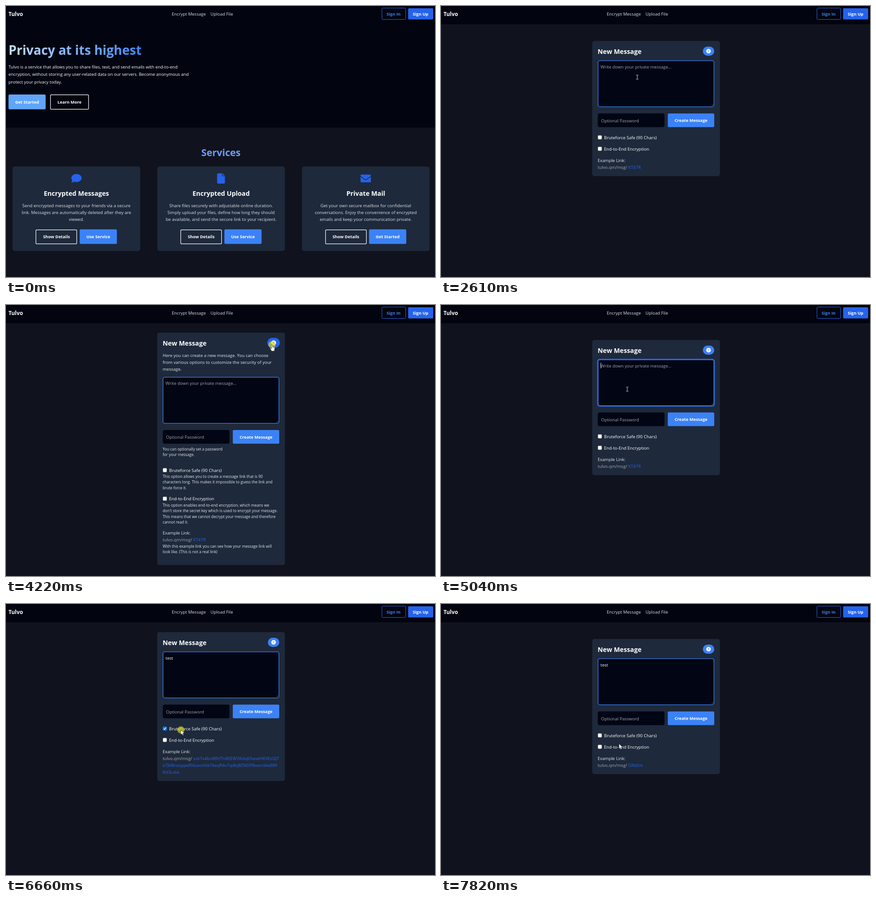
Animation of 942 by 594 pixels, one loop 8000 ms. Source, as an HTML page:

```html
<!DOCTYPE html>
<html lang="en">
<head>
<meta charset="utf-8">
<title>Private message demo</title>
<style>
html, body { margin: 0; width: 100%; height: 100%; overflow: hidden; background: #10121d; }
svg { display: block; width: 942px; height: 594px; font-family: 'Open Sans', 'Noto Sans', sans-serif; }
</style>
</head>
<body>
<svg id="stage" viewBox="0 0 942 594"></svg>
<script>
const LOOP = 8000, BASE = 9.5, SMALL = 8.35, TITLE = 14.2, LABEL = 9.2;
const DARK = '#020510', PAGE = '#10121d', CARD = '#1e293b', BLUE = '#3b82f6', DEEP = '#2563eb';
const SOFT = '#dde1e7', GREY = '#a0a7b3';

// y is the middle of the capitals
const text = (s, x, y, fill = '#fff', size = BASE, weight = 400, anchor = 'start') =>
  `<text x="${x}" y="${y + size * 0.37}" fill="${fill}" font-size="${size}" font-weight="${weight}" text-anchor="${anchor}">${s}</text>`;
const centered = (s, x, y, fill, size, weight) => text(s, x, y, fill, size, weight, 'middle');
const lines = (list, x, y, step, fill, size, anchor) =>
  list.map((s, i) => text(s, x, y + i * step, fill, size, 400, anchor)).join('');
const box = (x, y, w, h, fill, r = 0, extra = '') =>
  `<rect x="${x}" y="${y}" width="${w}" height="${h}" rx="${r}" fill="${fill}" ${extra}/>`;
const outline = (color, width) => `stroke="${color}" stroke-width="${width}"`;
const button = (label, x, y, w, h, fill) =>
  (fill ? box(x, y, w, h, fill, 2.5)
    : box(Math.round(x) + .6, Math.round(y) + .6, Math.round(w) - 1.2, Math.round(h) - 1.2, 'none', 2.2, outline('#fff', 1.2))) +
  centered(label, x + w / 2, y + h / 2 + .5, '#fff', LABEL, 700);

// Pointer: [time, x, y], eased between neighbours
const path = [
  [190, 890, 592], [990, 457, 88], [1050, 457, 88], [1450, 395, 18], [1920, 395, 18],
  [2500, 431, 156], [2740, 431, 156], [3420, 585, 96], [3700, 585, 96], [4050, 584, 87],
  [4350, 584, 87], [4900, 409, 184.5], [5640, 409, 184.5], [6050, 384, 276],
  [6780, 384, 276], [7120, 391, 306.5], [LOOP, 391, 306.5]
];
const clicks = [1400, 2750, 3560, 4130, 4850, 6050, 6590, 7140, 7480];
const between = (t, a, b) => t >= a && t < b;

function pointer(t) {
  const i = Math.max(1, path.findIndex(p => p[0] > t));
  const [t0, x0, y0] = path[i - 1], [t1, x1, y1] = path[i];
  const k = Math.min(1, Math.max(0, (t - t0) / (t1 - t0))), e = k * k * (3 - 2 * k);
  return { x: x0 + (x1 - x0) * e, y: y0 + (y1 - y0) * e };
}

const shapes = {
  arrow: '<path d="M0 0V10.5L2.4 8.3L4.2 12L5.8 11.3L4.2 7.6H7.5Z" fill="#fff" stroke="#111" stroke-width=".5"/>',
  hand: '<path d="M-1.2 .5Q0 -1 1.2 .5V5L5 6Q6.6 6.4 6.3 8.4L5.4 12V14H-1.6V12L-4.4 8.6Q-4 7-2.6 7.8L-1.2 9Z" fill="#fff" stroke="#111" stroke-width=".6"/>',
  beam: '<path d="M-2.5 -4.6H-.6L0 -4L.6 -4.6H2.5M0 -4V4M-2.5 4.6H-.6L0 4L.6 4.6H2.5" fill="none" stroke="#d5d7dc"/>'
};

function header(hover) {
  return text('Tulvo', 5.5, 17.5, '#fff', 11.86, 700) +
    text('Encrypt Message', 364, 17.2, hover ? '#fff' : SOFT) +
    text('Upload File', 449, 17.2, SOFT) +
    box(825.5, 4.5, 52, 25, 'none', 2, outline(DEEP, 1)) + centered('Sign In', 851, 17.3, BLUE, LABEL, 700) +
    box(883, 5, 55, 24.5, DEEP, 2) + centered('Sign Up', 910.3, 17.3, '#fff', LABEL, 700);
}

const icons = [
  `<ellipse cx="154.7" cy="377" rx="11.3" ry="9" fill="${DEEP}"/><path d="M145 379Q146 384 143 387Q148 387 151 384Z" fill="${DEEP}"/>`,
  `<path d="M466 366.8H474.5V371.5Q474.5 373 476 373H480.7V387Q480.7 389.3 478.5 389.3H466Q463.6 389.3 463.6 387V369Q463.6 366.8 466 366.8ZM475.8 366.8L480.7 371.7H475.8Z" fill="${DEEP}"/>`,
  box(778.5, 369.5, 22.7, 17, DEEP, 2.2) +
    `<path d="M778 373L788.2 380.4Q789.8 381.5 791.4 380.4L801.7 373" fill="none" ${outline(CARD, 1.5)}/>`
];
const services = [
  ['Encrypted Messages', 'Use Service', 'Send encrypted messages to your friends via a secure',
    'link. Messages are automatically deleted after they are', 'viewed.'],
  ['Encrypted Upload', 'Use Service', 'Share files securely with adjustable online duration.',
    'Simply upload your files, define how long they should', 'be available, and send the secure link to your recipient.'],
  ['Private Mail', 'Get Started', 'Get your own secure mailbox for confidential',
    'conversations. Enjoy the convenience of encrypted', 'emails and keep your communication private.']
];

function home(hover) {
  const cards = services.map(([title, action, ...about], i) => {
    const x = 14.4 + i * 317.7, mid = x + 140.2;
    return box(x, 351.7, 280.4, 185.3, CARD, 5) + icons[i] +
      centered(title, mid, 410.5, '#fff', TITLE, 700) +
      lines(about, mid, 437.3, 15.06, SOFT, BASE, 'middle') +
      button('Show Details', x + 51, 489.5, 91, 32) +
      button(action, x + 147.4, 489.5, 81.7, 32, BLUE);
  }).join('');
  return `<defs><linearGradient id="sky" gradientUnits="userSpaceOnUse" x1="6" x2="310">
      <stop stop-color="#bfdbfe"/><stop offset="1" stop-color="${BLUE}"/></linearGradient></defs>` +
    box(0, 0, 942, 266.5, DARK) + header(hover) +
    text('Privacy at its highest', 5.5, 97, 'url(#sky)', 28.1, 700) +
    lines(['Tulvo is a service that allows you to share files, text, and send emails with end-to-end',
      'encryption, without storing any user-related data on our servers. Become anonymous and',
      'protect your privacy today.'], 5.5, 133.6, 16.4, '#fff', 9.45) +
    button('Get Started', 5.5, 194, 81.5, 32.5, '#60a5fa') +
    button('Learn More', 97, 194, 84.7, 32.5) +
    centered('Services', 472, 320.8, '#6f9cf6', 21.2, 700) + cards;
}

const checkbox = (y, on) => box(344.6, y - 4.2, 8.4, 8.4, on ? '#1677e8' : '#fff', 1.4, outline(on ? '#1677e8' : '#777', .5)) +
  (on ? `<path d="M346.4 ${y}L348.2 ${y + 2}L351.4 ${y - 2.2}" fill="none" ${outline('#fff', 1.3)}/>` : '');

const longLink = ['xvkTx4bn8RHTn8EEW3KdqKXwwhlKXEsGJT', 'e7Jlt8nxsppeRlduvoh6kTkeqR4v7qdbj8ENDP8xenrbkdl89', '8d3Lvbx'];
const keyLink = ['RbWm4/pT7vKx2dHq9LnZs3GfYw6JcUe8B', 'h5NkQ1rVt0Mz'];

function compose(t, p) {
  const help = between(t, 3700, 4285), safe = between(t, 6130, 6730), e2e = between(t, 7210, 7550);
  const focus = between(t, 2740, 3560) || between(t, 4900, 6050);
  const link = safe ? longLink : e2e ? keyLink : [t < 6130 ? 'KT47R' : t < 7210 ? 'DWp3u' : 'GNdUo'];
  const typed = 'test'.slice(0, [5110, 5180, 5320, 5450].filter(at => t >= at).length);
  const top = help ? -16 : -7.5 * (link.length - 1);
  const [area, first, second, sample] = help ? [38.5, 74, 111.5, 161.5] : [top, top, top, top];
  const height = help ? 509.5 : 296.5 + 15 * (link.length - 1);

  const onHelp = Math.abs(p.x - 587.5) < 13 && Math.abs(p.y - 99 - top) < 12;
  const inArea = between(p.x, 344, 600) && between(p.y, 119 + area, 221 + area);
  const field = `x="344.8" y="${119.8 + area}" width="254.6" height="101" rx="4"`;
  const grip = 218 + area;

  const svg = box(0, 0, 942, 40, DARK) + header(t < 1980) +
    box(332, 76.5 + top, 280.5, height, CARD, 5) +
    text('New Message', 344, 100 + top, '#fff', TITLE, 700) +
    `<g transform="translate(587.5 ${99 + top}) scale(${onHelp ? 1.1 : 1})">` +
    box(-12.5, -10, 25, 20, onHelp ? DEEP : BLUE, 10) +
    '<circle r="5" fill="#fff"/>' + centered('?', 0, 0, onHelp ? DEEP : BLUE, 7.5, 700) + '</g>' +
    (help ? lines(['Here you can create a new message. You can choose',
      'from various options to customize the security of your', 'message.'], 344, 110.6, 15.06, '#e5e7eb') : '') +
    (focus ? `<rect ${field} fill="none" ${outline(DEEP, 5)} opacity=".5"/>` : '') +
    `<rect ${field} fill="#020513" ${outline(BLUE, focus ? 1.7 : 1.3)}/>` +
    `<path d="M594 ${grip + 1}L598 ${grip - 3}M596.5 ${grip + 1}L598 ${grip - .5}" ${outline('#8a8f99', .6)}/>` +
    text(typed || 'Write down your private message...', 350.3, 133.2 + area, typed ? '#fff' : GREY) +
    (between(t, 4900, 5110) ? box(350.6, 126.5 + area, .9, 12.5, '#fff') : '') +
    box(344.3, 235.5 + area, 146.5, 30, '#020513', 4) + text('Optional Password', 351.5, 251 + area, GREY) +
    button('Create Message', 498, 235.5 + area, 102, 30, BLUE) +
    checkbox(288 + first, safe) + text('Bruteforce Safe (90 Chars)', 358, 288.3 + first) +
    checkbox(313 + second, e2e) + text('End-to-End Encryption', 358, 313.3 + second) +
    text('Example Link:', 344, 338.3 + sample, '#e5e7eb') +
    text('tulvo.qm/msg/', 344, 353.4 + sample, GREY) +
    link.map((s, i) => text(s, i ? 344 : 411, 353.4 + sample + i * 15.06, DEEP)).join('') +
    (help ? [
      [315.7, 'You can optionally set a password', 'for your message.'],
      [375.8, 'This option allows you to create a message link that is 90',
        'characters long. This makes it impossible to guess the link and', 'brute force it.'],
      [438.5, 'This option enables end-to-end encryption, which means we',
        "don't store the secret key which is used to encrypt your message.",
        'This means that we cannot decrypt your message and therefore', 'cannot read it.'],
      [528.6, 'With this example link you can see how your message link will', 'look like. (This is not a real link)']
    ].map(([y, ...s]) => lines(s, 344, y, 12.55, '#e5e7eb', SMALL)).join('') : '');
  return { svg, shape: onHelp ? 'hand' : inArea ? 'beam' : 'arrow' };
}

function draw(t) {
  const p = pointer(t), onNav = between(p.x, 364, 439) && between(p.y, 10, 25);
  const scene = t < 1720 ? { svg: home(onNav), shape: 'arrow' } : compose(t, p);
  const shape = onNav ? 'hand' : scene.shape;
  let svg = box(0, 0, 942, 594, PAGE) + scene.svg;
  if (between(t, 1400, 1980)) svg += box(-3, 590, 71, 8, '#1a1712', 2) + text('tulvo.qm/msg', 8, 596, '#b8b5ae', 7.5);
  if (clicks.some(c => between(t, c, c + 145)))
    svg += `<circle cx="${p.x}" cy="${p.y}" r="7.8" fill="#d8d41c" opacity=".68"/>`;
  if (t >= 190 && !between(t, 5110, 5640))
    svg += `<g transform="translate(${p.x} ${p.y})">${shapes[shape]}</g>`;
  return svg;
}

const stage = document.getElementById('stage');
const start = performance.now();
let shown = '';
function tick() {
  const svg = draw((performance.now() - start) % LOOP);
  if (svg !== shown) stage.innerHTML = shown = svg;
  requestAnimationFrame(tick);
}
tick();
</script>
</body>
</html>
```
